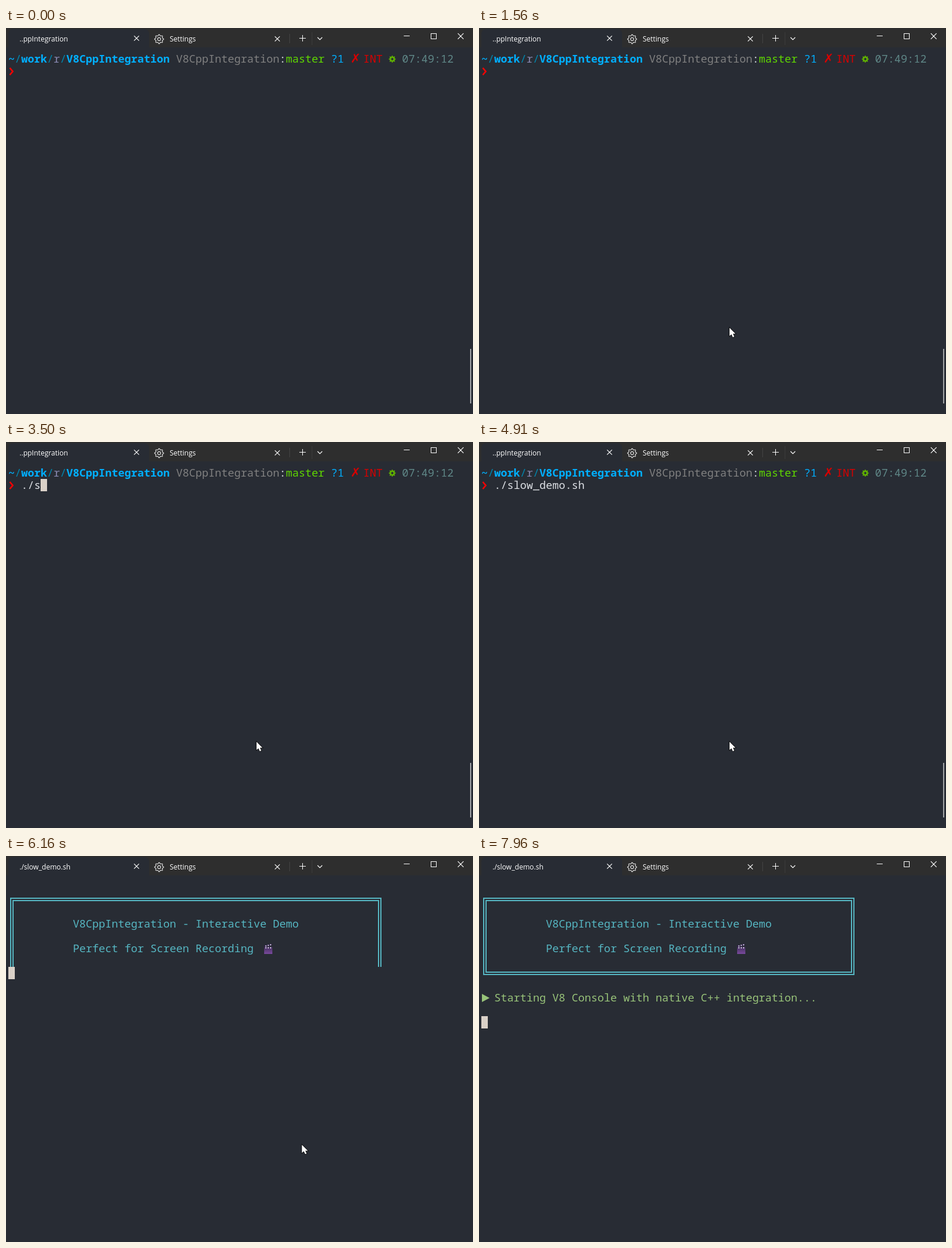
An HTML page with a canvas that plays this animation: 796x658 px, repeating every 8000 ms.

```html
<!DOCTYPE html>
<html lang="en">
<head>
<meta charset="utf-8">
<title>Terminal demo</title>
<style>
html, body { margin: 0; width: 100%; height: 100%; overflow: hidden; background: #282c34; }
canvas { display: block; }
</style>
</head>
<body>
<canvas id="stage" width="796" height="658"></canvas>
<script>
const ctx = document.getElementById('stage').getContext('2d', { alpha: false });
const LOOP = 8000, CELL = 11, LINE = 21, LEFT = 4, TOP = 42;
const BG = '#282c34', FG = '#dcdfe4', CYAN = '#56b6c2', GREEN = '#98c379', CURSOR = '#dad1c8';
const BLUE = '#00afff', DIM = '#0087af', RED = '#d70000';
const MONO = '500 18.333px "Noto Sans Mono", "DejaVu Sans Mono", monospace';
const BOLD = MONO.replace('500', '600');
const SYMBOL = '21px "DejaVu Sans", sans-serif';
const COMMAND = './slow_demo.sh';

// Moments of the story in ms
const KEYS = [2730, 2820, 3500, 3700, 3980, 4250];
const BLINKS = [1030, 1560, 2090, 2640, 2730, 4910, 5110, 6780, 7960];
const ENTER = 5110, CLEAR = 5200, MESSAGE = 7380;
const FIRST_ROW = 5080, ROW_TIME = 205, BOX_END = 7;

const PROMPT = [
  ['~', BLUE, BOLD], ['/', DIM], ['work', BLUE, BOLD], ['/', DIM], ['r', '#8787af'], ['/', DIM],
  ['V8CppIntegration ', BLUE, BOLD], ['V8CppIntegration', '#808080'], [':', FG],
  ['master ', '#5fd700'], ['?1 ', BLUE], ['✗ ', RED, SYMBOL], ['INT   ', RED], ['07:49:12', '#5f8787']
];

const passed = (times, t) => times.filter(time => t >= time).length;
const clamp = v => Math.max(0, Math.min(1, v));

function print(col, row, text, color = FG, font = MONO) {
  ctx.font = font;
  ctx.fillStyle = color;
  ctx.fillText(text, LEFT + col * CELL, TOP + row * LINE + 17);
}

function rect(x, y, w, h, color) {
  ctx.fillStyle = color;
  ctx.fillRect(x, y, w, h);
}

function trace(points, x = 0, y = 0) {
  ctx.beginPath();
  for (let i = 0; i < points.length; i += 2) ctx.lineTo(x + points[i], y + points[i + 1]);
}

function line(points, color = '#fff', width = 1) {
  trace(points);
  ctx.strokeStyle = color;
  ctx.lineWidth = width;
  ctx.stroke();
}

function cross(x, y, r) {
  line([x - r, y - r, x + r, y + r], '#fff', 1.2);
  line([x - r, y + r, x + r, y - r], '#fff', 1.2);
}

function gearPath(x, y, inner, outer, hole, teeth = 8) {
  ctx.beginPath();
  for (let i = 0; i < teeth * 4; i++) {
    const a = (i - 0.5) * Math.PI / teeth / 2;
    const r = i % 4 < 2 ? outer : inner;
    ctx.lineTo(x + r * Math.cos(a), y + r * Math.sin(a));
  }
  ctx.closePath();
  ctx.moveTo(x + hole, y);
  ctx.arc(x, y, hole, 0, 2 * Math.PI);
}

function drawTitleBar(title) {
  rect(0, 0, 796, 33, '#2e2e2e');
  ctx.fillStyle = BG;
  ctx.beginPath();
  ctx.roundRect(4, 2, 240, 40, 8);
  ctx.fill();
  rect(0, 33, 796, 9, BG);

  ctx.font = '500 12px "Open Sans", "Noto Sans", sans-serif';
  ctx.fillStyle = '#fff';
  ctx.fillText(title, 23, 23);
  ctx.fillText('Settings', 279, 23);
  cross(222.5, 17.5, 4.2);
  cross(462.5, 18.5, 4.2);

  gearPath(261, 19, 6, 7.7, 2.6);
  ctx.strokeStyle = '#e4e4e4';
  ctx.lineWidth = 1.1;
  ctx.stroke();

  rect(483, 10, 1, 16, '#444');
  rect(521, 7, 1, 22, '#3c3c3c');
  line([500, 17.5, 511, 17.5]);
  line([505.5, 12, 505.5, 23]);
  line([531, 16, 535, 20, 539, 16], '#fff', 1.2);
  line([678, 13.5, 688, 13.5]);
  ctx.strokeRect(724.5, 9.5, 9, 9);
  cross(775, 14, 4.8);
}

function drawPrompt(keys) {
  let col = 0;
  for (const [text, color, font] of PROMPT) {
    print(col, 0, text, color, font);
    col += text.length;
  }
  gearPath(658.4, 53, 4.5, 6, 1.9);
  ctx.fillStyle = '#5faf00';
  ctx.fill('evenodd');
  line([6.5, 68, 11.5, 74, 6.5, 80], '#f00', 2.6);

  // The last key completes the whole command
  print(2, 1, COMMAND.slice(0, keys < KEYS.length ? keys : COMMAND.length));
  rect(791, 547, 2, 93, '#a2a4a7');
}

function drawClapper(x, y) {
  const shade = ctx.createLinearGradient(0, y + 6, 0, y + 17);
  shade.addColorStop(0, '#473261');
  shade.addColorStop(1, '#7a4a9e');
  rect(x + 1, y + 5, 14, 12, shade);
  line([x + 1, y + 4, x + 14, y + 1], '#33244b', 3);
  for (let i = 0; i < 3; i++) {
    const sx = x + 3 + i * 4;
    line([sx, y + 3.6 - i, sx + 2, y + 3.1 - i], '#d9d3e6', 2);
    line([sx, y + 6.5, sx + 2, y + 6.5], '#d9d3e6', 2);
  }
}

function drawOutput(row, hasMessage) {
  ctx.save();
  ctx.beginPath();
  ctx.rect(0, TOP, 796, (row + 1) * LINE);
  ctx.clip();
  ctx.strokeStyle = CYAN;
  ctx.lineWidth = 2;
  ctx.strokeRect(8, 72, 631, 130);
  ctx.strokeRect(12, 76, 623, 122);
  print(10, 3, 'V8CppIntegration - Interactive Demo', CYAN);
  print(10, 5, 'Perfect for Screen Recording', CYAN);
  if (row >= 5) drawClapper(439, 150);
  ctx.restore();
  if (!hasMessage) return;
  trace([5, 235, 18, 242, 5, 249]);
  ctx.fillStyle = GREEN;
  ctx.fill();
  print(2, 9, 'Starting V8 Console with native C++ integration...', GREEN);
}

// The pointer enters, rests, crosses to the right and leaves.
function drawPointer(t) {
  if (t < 480 || t >= 7710) return;
  let x = 692, y = 621;
  const glide = (start, end, toX, toY) => {
    const p = clamp((t - start) / (end - start));
    x += (toX - x) * p;
    y += (toY - y) * p;
  };
  glide(480, 700, 427, 511);
  glide(6100, 6320, 706, 443);
  glide(7500, 7660, 780, 432);

  trace([0, 0, 0, 14, 3.2, 11.2, 5.6, 16.2, 8.2, 15, 5.9, 10.3, 10.2, 10.3], x, y);
  ctx.closePath();
  ctx.strokeStyle = '#000';
  ctx.lineWidth = 1.4;
  ctx.stroke();
  ctx.fillStyle = '#fff';
  ctx.fill();
}

function draw(t) {
  const keys = passed(KEYS, t);
  const row = Math.min(BOX_END, 1 + Math.floor((t - FIRST_ROW) / ROW_TIME));
  const hasMessage = t >= MESSAGE;
  rect(0, 0, 796, 658, BG);
  drawTitleBar(t < ENTER ? '..ppIntegration' : COMMAND);
  if (t < CLEAR) drawPrompt(keys);
  else drawOutput(row, hasMessage);

  if (passed(BLINKS, t) % 2) {
    const typing = t < ENTER;
    const col = !typing ? 0 : keys < KEYS.length ? 2 + keys : 3 + COMMAND.length;
    const line = typing ? 1 : hasMessage ? 11 : row < BOX_END ? row + 1 : 9;
    rect(LEFT + col * CELL, TOP + line * LINE, CELL, LINE, CURSOR);
  }
  drawPointer(t);
}

const begin = performance.now();
function tick() {
  draw((performance.now() - begin) % LOOP);
  requestAnimationFrame(tick);
}
tick();
</script>
</body>
</html>
```
